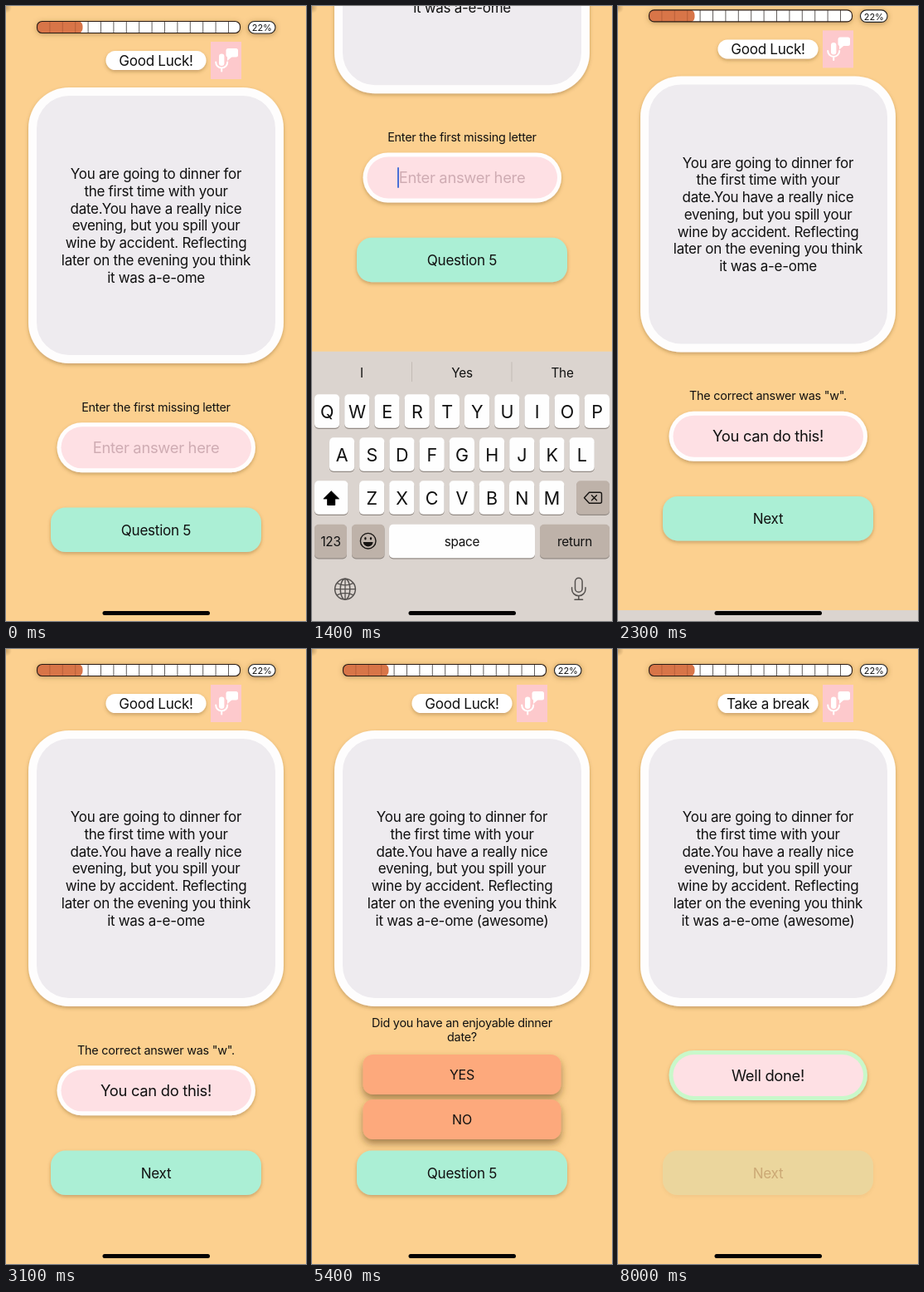
Recreate the animation shown at these times as an HTML page. Size 362 by 740 pixels, loop 8.1 s.

```html
<!DOCTYPE html>
<html lang="en">
<head>
<meta charset="utf-8">
<title>Missing letter quiz</title>
<style>
  html, body { margin: 0; width: 100%; height: 100%; overflow: hidden; background: #fcd08f; }
  svg { display: block; width: 362px; height: 740px; }
  text { font-family: Inter, Roboto, "Liberation Sans", sans-serif; letter-spacing: -0.017em; text-anchor: middle; fill: #111; }
</style>
</head>
<body>
<svg id="stage" viewBox="0 0 362 740" xmlns="http://www.w3.org/2000/svg">
  <defs>
    <filter id="shadow" x="-20%" y="-40%" width="140%" height="190%">
      <feDropShadow dx="0" dy="2" stdDeviation="2" flood-color="#6b4a20" flood-opacity=".36"/>
    </filter>
    <filter id="glow" x="-20%" y="-80%" width="140%" height="260%">
      <feDropShadow dx="0" dy="1" stdDeviation="3" flood-color="#6b4a20" flood-opacity=".5"/>
    </filter>
    <filter id="deep" x="-20%" y="-50%" width="140%" height="220%">
      <feDropShadow dx="0" dy="5" stdDeviation="5" flood-color="#6b4a20" flood-opacity=".6"/>
    </filter>
    <radialGradient id="corner">
      <stop offset="0" stop-color="#7a5a30" stop-opacity=".4"/>
      <stop offset="1" stop-color="#7a5a30" stop-opacity="0"/>
    </radialGradient>
    <clipPath id="track"><rect x="37.5" y="18.5" width="245" height="14" rx="6"/></clipPath>
  </defs>
  <rect width="362" height="740" fill="#fcd08f"/>
  <g id="page"></g>
  <g id="keyboard"></g>
  <circle r="7" cy="2" fill="url(#corner)"/>
  <rect x="116.5" y="728" width="129.5" height="5" rx="2.5" fill="#050303"/>
</svg>
<script>
const LOOP = 8100;
const TAP_FIELD = 872, SUBMIT = 2030, ASK = 4330, ANSWER = 6460;
const PRESSES = [[1780, SUBMIT], [4130, ASK], [7840, 8200]];
const KEYBOARD_H = 324.5, PAGE_SHIFT = 325;
const CX = 181;

const $ = id => document.getElementById(id);

function add(parent, tag, attrs = {}, content = '') {
  const el = document.createElementNS('http://www.w3.org/2000/svg', tag);
  for (const k in attrs) el.setAttribute(k, attrs[k]);
  el.textContent = content;
  parent.appendChild(el);
  return el;
}
const box = (p, x, y, width, height, rx, fill, more) =>
  add(p, 'rect', { x, y, width, height, rx, fill, ...more });
const label = (p, x, cy, size, str, more) =>
  add(p, 'text', { x, y: cy + size * 0.364, 'font-size': size, ...more }, str);
const stroke = (p, d, color, width) =>
  add(p, 'path', { d, fill: 'none', stroke: color, 'stroke-width': width, 'stroke-linecap': 'round', 'stroke-linejoin': 'round' });
const group = (p, more) => add(p, 'g', more);
const cast = name => ({ filter: `url(#${name})` });
const shadow = cast('shadow');

// Page
const page = $('page');

function drawProgress() {
  const glow = cast('glow');
  box(page, 37.5, 18.5, 245, 14, 6, '#fff', glow);
  const inner = group(page, { 'clip-path': 'url(#track)' });
  box(inner, 30, 18, 62.5, 15, 6, '#d87548');
  for (let i = 1; i < 16; i++) {
    const x = 37.5 + i * 15.4;
    stroke(inner, `M${x} 18V33`, x < 92 ? '#b05c38' : '#3c3734', 0.8);
  }
  box(page, 37.5, 18.5, 245, 14, 6, 'none', { stroke: '#2b1c14', 'stroke-width': 1.1 });
  box(page, 292.5, 18.5, 32.5, 14.5, 7.2, '#fff', { stroke: '#222', 'stroke-width': 1.1, ...glow });
  label(page, 308.7, 26.3, 11, '22%');
}

function drawMic() {
  box(page, 247, 43, 37, 45, 0, '#fdc9cc');
  box(page, 257, 57.5, 6.4, 14.5, 3.2, '#fff');
  stroke(page, 'M253.2 67.5a7 7 0 0 0 14 0M260.2 74.8V78.6', '#fff', 2);
  box(page, 265.5, 51, 14.5, 10.6, 2.5, '#fff');
  add(page, 'path', { d: 'M267 60h7l-7 6z', fill: '#fff' });
}

function drawCard() {
  box(page, 27, 98, 308, 332, 49, '#fefdfd', shadow);
  box(page, 37, 108, 288, 312, 39, '#eeebef');
  const lines = [
    'You are going to dinner for', 'the first time with your', 'date.You have a really nice',
    'evening, but you spill your', 'wine by accident. Reflecting',
    'later on the evening you think', ''
  ];
  return lines.map((s, i) => label(page, CX, 202 + i * 20.75, 17, s)).pop();
}

function drawField(parent, cy, border) {
  box(parent, 61.5, cy - 30, 239.5, 60, 30, border, shadow);
  box(parent, 66.5, cy - 25, 229.5, 50, 25, '#fee0e4');
  return label(parent, CX, cy, 18.4, '');
}

function drawChoice(cy, str) {
  const g = group(page);
  box(g, 61.5, cy - 24, 239, 48, 12, '#fda97c', cast('deep'));
  label(g, CX, cy, 16, str);
  return { g, cy };
}

drawProgress();
box(page, 120.5, 54, 121, 23, 11.5, '#fff', shadow);
const header = label(page, CX, 65.5, 17.1, '');
drawMic();
const lastLine = drawCard();

const entry = group(page);
const hint = label(entry, CX, 482.5, 14.4, '');
const fieldText = drawField(entry, 531.3, '#fffdfd');
const caret = box(entry, 103, 518.8, 2, 25, 1, '#4a6fd6');

const question = group(page);
label(question, CX, 449.5, 14.4, 'Did you have an enjoyable dinner');
label(question, CX, 467, 14.4, 'date?');
const choices = [drawChoice(512, 'YES'), drawChoice(566, 'NO')];

const result = group(page);
drawField(result, 513, '#c9f8ca').textContent = 'Well done!';

const button = group(page);
box(button, 54, 603.5, 254, 53.5, 18, '#abefd5', shadow);
const buttonText = label(button, CX, 630.5, 17.1, '');

// Keyboard, drawn with its top edge at 0
const keyboard = $('keyboard');
const WHITE = '#fefefe', GREY = '#beb2a9';

function key(x, y, w, str = '', size = 21.5, fill = WHITE) {
  box(keyboard, x, y + 1.2, w, 40.5, 5, '#938b85');
  box(keyboard, x, y, w, 40.5, 5, fill);
  label(keyboard, x + w / 2, y + 20.5, size, str);
}

box(keyboard, 0, 0, 362, 340, 0, '#dbd4cf');
for (const x of [120.5, 241]) stroke(keyboard, `M${x} 13V36`, '#c3bbb5', 1);
const suggestions = ['I', 'Yes', 'The'].map((word, i) => {
  const el = label(keyboard, 60 + i * 121, 25.5, 15.3, '');
  return [...word].map((c, j) => ({ el: add(el, 'tspan', {}, c), late: j === 2 }));
}).flat();

[['QWERTYUIOP', 3], ['ASDFGHJKL', 21], ['ZXCVBNM', 57]].forEach(([letters, x], row) =>
  [...letters].forEach((c, i) => key(x + i * 36.2, 51.5 + row * 52, 30.2, c)));

key(3, 155.5, 40.5);
add(keyboard, 'path', { d: 'M23.2 168l9.3 9.2h-4.8v7.6h-9v-7.6h-4.8z', fill: '#000', stroke: '#000', 'stroke-linejoin': 'round' });
key(319, 155.5, 40, '', 15, GREY);
stroke(keyboard, 'M328.5 176l6-6.5h13a2 2 0 0 1 2 2v9a2 2 0 0 1-2 2h-13zM337.5 173l6 6m0-6l-6 6', '#171412', 1.4);

key(3, 208, 39, '123', 15.3, GREY);
key(48, 208, 39.5, '', 15, GREY);
key(93, 208, 176, 'space', 15.3);
key(275, 208, 84, 'return', 15.3, GREY);

add(keyboard, 'circle', { cx: 67.7, cy: 228, r: 9.3, fill: 'none', stroke: '#171412', 'stroke-width': 1.4 });
for (const x of [64.4, 71]) add(keyboard, 'ellipse', { cx: x, cy: 225, rx: 1.2, ry: 1.7, fill: '#171412' });
add(keyboard, 'path', { d: 'M61.8 229.3h11.8a5.9 5.4 0 0 1-11.8 0z', fill: '#171412' });

const INK = '#55514f';
for (const rx of [12.4, 5.8])
  add(keyboard, 'ellipse', { cx: 40, cy: 286, rx, ry: 12.4, fill: 'none', stroke: INK, 'stroke-width': 1.5 });
stroke(keyboard, 'M40 274V298M28 286H52M30.5 279q9.5 4.5 19 0M30.5 293q9.5-4.5 19 0', INK, 1.3);
box(keyboard, 317.5, 272.5, 8.6, 17, 4.3, 'none', { stroke: INK, 'stroke-width': 1.5 });
stroke(keyboard, 'M313.6 284v2a8.2 8 0 0 0 16.4 0v-2M321.8 294v4.5M317 298.5h9.6', INK, 1.5);

// Motion
const clamp = v => Math.min(1, Math.max(0, v));
const easeInOut = v => v < 0.5 ? 2 * v * v : 1 - 2 * (1 - v) ** 2;

// Critically damped slide, 0 to 1
function slide(ms) {
  const x = Math.max(0, ms) * 0.0185;
  return 1 - (1 + x) * Math.exp(-x);
}

// Slightly bouncy spring, 0 to 1
function spring(ms) {
  const s = Math.max(0, ms) / 1000, w = 10.45, decay = 11;
  return 1 - Math.exp(-decay * s) * (Math.cos(w * s) + decay / w * Math.sin(w * s));
}

function pressOpacity(t, [down, up]) {
  return t < up
    ? 1 - 0.8 * easeInOut(clamp((t - down) / 150))
    : 0.2 + 0.8 * easeInOut(clamp((t - up) / 250));
}

const show = (el, on) => el.setAttribute('display', on ? 'inline' : 'none');
const setText = (el, str) => { if (el.textContent !== str) el.textContent = str; };
const scaleAt = (el, cy, s) =>
  el.setAttribute('transform', `translate(${CX} ${cy}) scale(${s}) translate(${-CX} ${-cy})`);

function render(t) {
  const submitted = t >= SUBMIT, asked = t >= ASK, answered = t >= ANSWER;

  const raised = slide(t - TAP_FIELD) - slide(t - SUBMIT);
  const lifted = slide(t - TAP_FIELD - 6.5) - slide(t - SUBMIT - 3);
  keyboard.setAttribute('transform', `translate(0 ${740 - KEYBOARD_H * raised})`);
  show(keyboard, raised > 0.001);
  page.setAttribute('transform', `translate(0 ${-PAGE_SHIFT * lifted})`);
  for (const { el, late } of suggestions)
    el.setAttribute('fill-opacity', clamp((t - (late ? 960 : 860)) / 180));

  setText(header, answered ? 'Take a break' : 'Good Luck!');
  setText(lastLine, asked ? 'it was a-e-ome (awesome)' : 'it was a-e-ome');

  show(entry, !asked);
  setText(hint, submitted ? 'The correct answer was "w".' : 'Enter the first missing letter');
  setText(fieldText, submitted ? 'You can do this!' : 'Enter answer here');
  fieldText.style.fill = submitted ? '#111' : '#cfacb3';
  show(caret, t >= TAP_FIELD && !submitted && (t - TAP_FIELD) % 1000 < 600);

  show(question, asked && !answered);
  for (const { g, cy } of choices) {
    show(g, asked && !answered);
    scaleAt(g, cy, spring(t - ASK));
  }
  choices[0].g.setAttribute('opacity', pressOpacity(t, [6300, ANSWER]));

  show(result, answered);
  scaleAt(result, 513, spring(t - ANSWER));

  setText(buttonText, answered || (submitted && !asked) ? 'Next' : 'Question 5');
  button.setAttribute('opacity', Math.min(...PRESSES.map(p => pressOpacity(t, p))));
}

const start = performance.now();
function tick() {
  render((performance.now() - start) % LOOP);
  requestAnimationFrame(tick);
}
tick();
</script>
</body>
</html>
```
